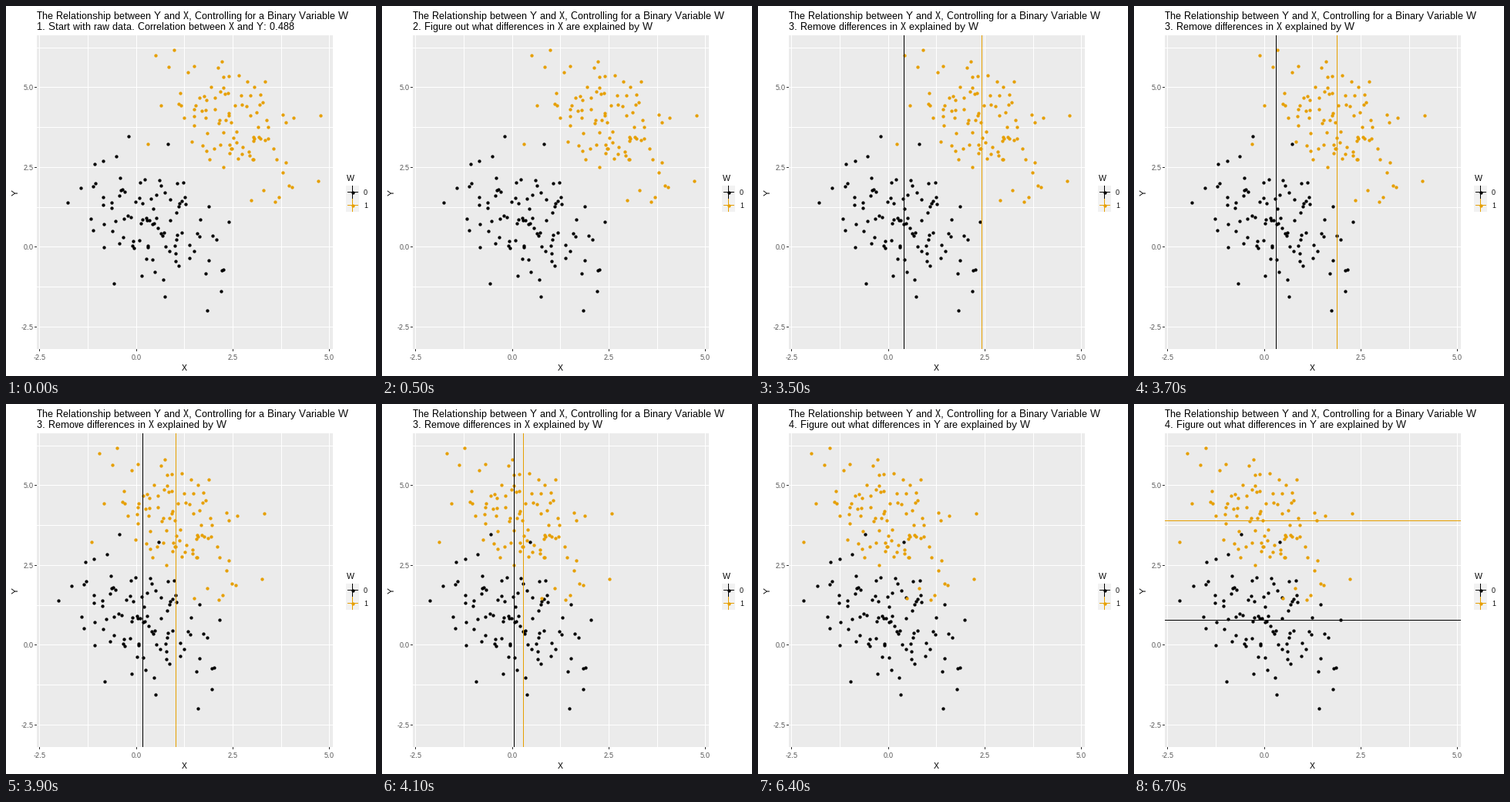
A matplotlib script for the animation above (8000 ms loop, 480 by 480 pixels).

```python
import math

import numpy as np
import matplotlib.pyplot as plt
from matplotlib.animation import FuncAnimation
from matplotlib.patches import Rectangle

SIZE, DPI = 480, 72
STEP_MS, LOOP_MS = 100, 8000
LEFT, TOP, RIGHT, BOTTOM = 40, 38, 424, 445
COLORS = ("#000000", "#E69F00")
X_MEANS, Y_MEANS = (0.41, 2.5), (0.78, 3.9)

STEPS = [
    (0, "1. Start with raw data. Correlation between X and Y: 0.488"),
    (500, "2. Figure out what differences in X are explained by W"),
    (3500, "3. Remove differences in X explained by W"),
    (6400, "4. Figure out what differences in Y are explained by W"),
]

# The farthest observations of each group; the rest follow the model.
EXTREMES = (
    [(-1.79, 1.41), (-1.45, 1.87), (-0.21, 3.49), (0.80, 3.24),
     (1.82, -1.97), (2.18, -1.37), (0.72, -1.53), (-0.59, -1.13)],
    [(0.49, 6.02), (0.96, 6.19), (0.29, 3.24), (2.20, 5.83),
     (4.76, 4.14), (4.70, 2.08), (3.58, 1.43), (2.96, 1.48)],
)


def px(x):
    return np.round(168.7 + 50.1 * np.asarray(x))


def py(y):
    return np.round(312.3 - 41.4 * np.asarray(y))


def sample(w, count=100):
    """Y = -X/2 + noise around the group means, with trimmed tails."""
    rng = np.random.default_rng(20 + w)
    noise = rng.normal(size=(count * 3, 2))
    noise = noise[np.hypot(*noise.T) < 2.1][:count - len(EXTREMES[w])]
    x, y = noise[:, 0], noise[:, 1] - 0.5 * noise[:, 0]
    means = np.array([X_MEANS[w], Y_MEANS[w]])
    core = np.column_stack([x, y])
    core += (count * means - np.sum(EXTREMES[w], axis=0)) / len(core) \
        - core.mean(axis=0)
    return np.vstack([EXTREMES[w], core])


plt.rcParams.update({"font.family": "Liberation Sans",
                     "text.hinting": "native", "text.hinting_factor": 1})
fig = plt.figure(figsize=(SIZE / DPI, SIZE / DPI), dpi=DPI, facecolor="white")
ax = fig.add_axes([0, 0, 1, 1])
ax.set_xlim(-0.5, SIZE - 0.5)
ax.set_ylim(SIZE - 0.5, -0.5)
ax.axis("off")


def line(x, y, color, z=1):
    return ax.plot(x, y, color=color, lw=1, antialiased=False, snap=False,
                   solid_capstyle="butt", zorder=z)[0]


def box(x0, y0, x1, y1, fill):
    ax.add_patch(Rectangle((x0 - 0.5, y0 - 0.5), x1 - x0, y1 - y0,
                           facecolor=fill, lw=0, zorder=0))


def label(x, y, text, size, color="black", **kw):
    return ax.text(x, y, text, fontsize=size, color=color, **kw)


def dots(x, y, color):
    return ax.plot(x, y, "o", ms=4.3, mew=0, color=color,
                   antialiased=False, snap=False, zorder=3)[0]


# Panel, grid and axes
box(LEFT, TOP, RIGHT, BOTTOM, "#EBEBEB")
span_x, span_y = (LEFT - 0.5, RIGHT - 0.5), (TOP - 0.5, BOTTOM - 0.5)
for x in px(np.arange(-2.5, 5.1, 1.25)):
    line((x, x), span_y, "white")
for y in py(np.arange(-2.5, 6.3, 1.25)):
    line(span_x, (y, y), "white")
for value in (-2.5, 0.0, 2.5, 5.0):
    x, y = px(value), py(value)
    line((x, x), (BOTTOM - 0.5, BOTTOM + 2.5), "#333333")
    label(x, 458.5, f"{value}", 9, "#4D4D4D", ha="center")
    line((LEFT - 3.5, LEFT - 0.5), (y, y), "#333333")
    label(35.5, y + 3.5, f"{value}", 9, "#4D4D4D", ha="right")
label(231, 472.5, "X", 11, ha="center")
label(12, 242, "Y", 11, rotation=90, ha="center", va="center")

# Legend
label(441, 226.5, "W", 11)
for w, color in enumerate(COLORS):
    y = 241 + 17 * w
    box(441, y - 8, 458, y + 9, "#F2F2F2")
    line((449, 449), (y - 8.5, y + 8.5), color, 2)
    line((442.5, 456.5), (y, y), color, 2)
    dots([449], [y], color)
    label(463.5, y + 3.5, str(w), 9)

label(39.5, 16.5,
      "The Relationship between Y and X, Controlling for a Binary Variable W",
      13)
subtitle = label(39.5, 30.5, "", 13)

samples = [sample(w) for w in (0, 1)]
groups = [dots(px(s[:, 0]), py(s[:, 1]), c) for s, c in zip(samples, COLORS)]
x_marks = [line((0, 0), span_y, c, 4) for c in COLORS]
y_marks = [line(span_x, [py(m)] * 2, c, 4) for m, c in zip(Y_MEANS, COLORS)]


def draw(frame):
    now = frame * STEP_MS
    subtitle.set_text([text for start, text in STEPS if now >= start][-1])

    progress = min(max((now - 3400) / 900, 0), 1)
    eased = (1 - math.cos(math.pi * progress)) / 2
    for points, group, mean, mark in zip(samples, groups, X_MEANS, x_marks):
        group.set_xdata(px(points[:, 0] - eased * mean))
        mark.set_xdata([px(mean * (1 - eased))] * 2)
        mark.set_visible(800 <= now < 6400)
    for mark in y_marks:
        mark.set_visible(now >= 6700)
    return [subtitle, *groups, *x_marks, *y_marks]


anim = FuncAnimation(fig, draw, frames=LOOP_MS // STEP_MS,
                     interval=STEP_MS, repeat=True, repeat_delay=0)
plt.show()
```
